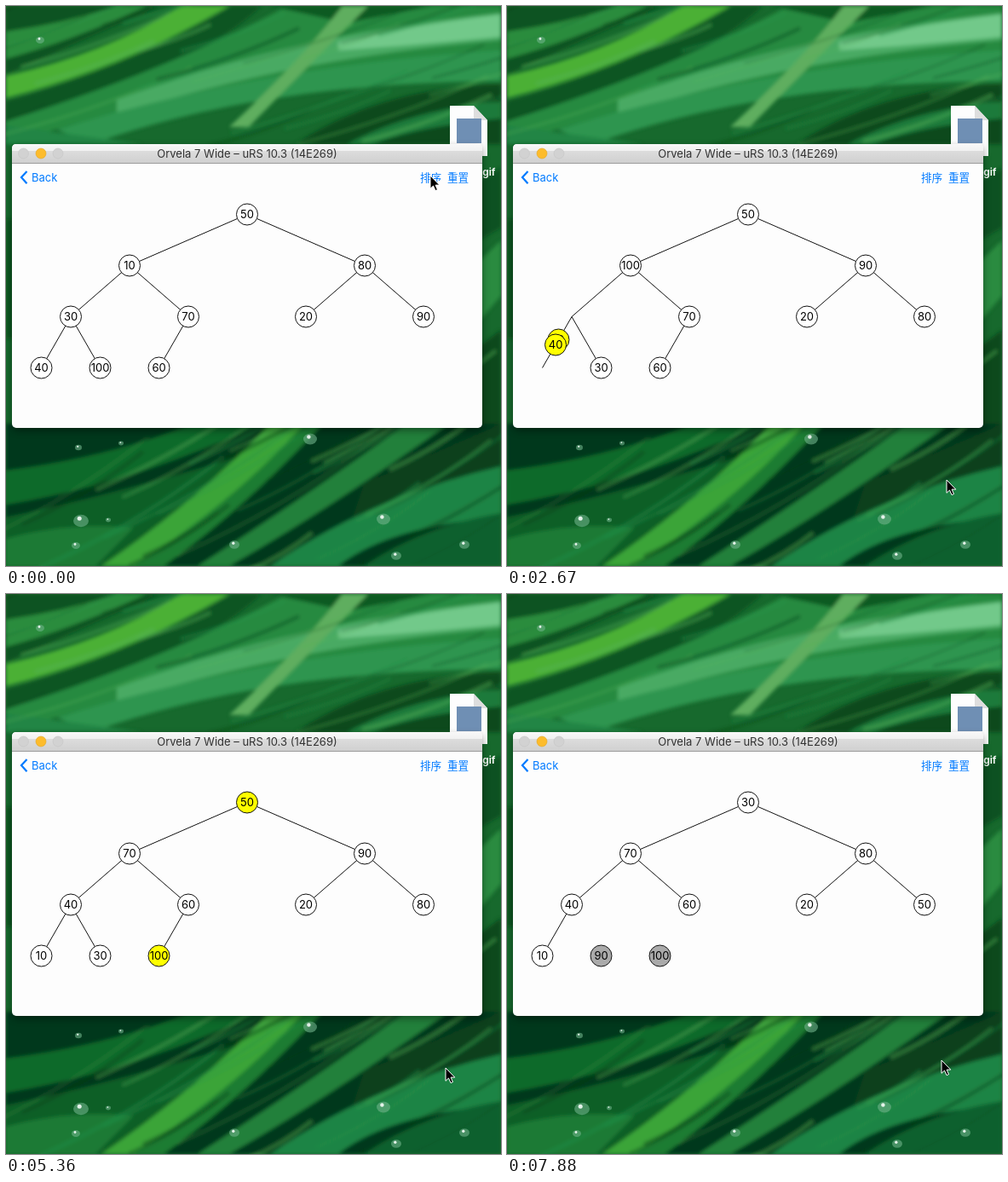
Recreate the animation shown at these times as an HTML page. Size 581 px wide and 657 px high, loop 8 s.

```html
<!DOCTYPE html>
<html lang="en">
<head>
<meta charset="utf-8">
<title>Heap sort</title>
<style>
  html, body { margin: 0; width: 100%; height: 100%; overflow: hidden; background: #0a4a1c; }
  svg { display: block; width: 581px; height: 657px; }
  text { font-family: Inter, "Noto Sans CJK SC", "Noto Sans CJK", sans-serif; font-size: 13px; }
  .mid { text-anchor: middle; }
  .link { fill: #007aff; }
</style>
</head>
<body>
<svg viewBox="0 0 581 657">
  <defs>
    <linearGradient id="bar" x1="0" y1="0" x2="0" y2="1">
      <stop offset="0" stop-color="#f8f8f8"/>
      <stop offset=".33" stop-color="#f1f1f1"/>
      <stop offset=".37" stop-color="#dcdcdc"/>
      <stop offset="1" stop-color="#cfcfcf"/>
    </linearGradient>
    <filter id="soft"><feGaussianBlur stdDeviation="2"/></filter>
    <filter id="shade" x="-10%" y="-10%" width="120%" height="120%"><feGaussianBlur stdDeviation="5"/></filter>
  </defs>
  <rect width="581" height="657" fill="#17692d"/>
  <g id="grass" filter="url(#soft)"></g>
  <g id="drops"></g>

  <path d="M521 117H549L565 134V176H521Z" fill="#fdfdfd"/>
  <path d="M549 117V134H565Z" fill="#dedede"/>
  <rect x="529" y="132" width="29" height="29" fill="#6f8fb4"/>
  <text x="574.5" y="199" text-anchor="end" fill="#fff" font-weight="600" style="font-size:12px">gif</text>

  <rect x="7" y="166" width="552" height="332" rx="5" opacity=".4" filter="url(#shade)"/>
  <rect x="7" y="162" width="552" height="333" rx="5" fill="#fdfdfd"/>
  <path d="M7 185V167Q7 162 12 162H554Q559 162 559 167V185Z" fill="url(#bar)"/>
  <path d="M7 184.5H559" stroke="#9c9c9c"/>
  <g stroke-width=".6">
    <circle cx="20.500" cy="173" r="6" fill="#d2d2d2" stroke="#c4c4c4"/>
    <circle cx="41" cy="173" r="6" fill="#fdbc2c" stroke="#e3a51f"/>
    <circle cx="61" cy="173" r="6" fill="#d2d2d2" stroke="#c4c4c4"/>
  </g>
  <text class="mid" x="283" y="178" fill="#333">Orvela 7 Wide – uRS 10.3 (14E269)</text>

  <path d="M24.500 194L18 201L24.500 208.300" fill="none" stroke="#007aff" stroke-width="2.200"/>
  <text class="link" x="30" y="206">Back</text>
  <text class="link" id="sort" x="486" y="206" style="font-size:12.6px">排序</text>
  <text class="link" x="518" y="206" style="font-size:12.6px">重置</text>

  <g id="edges" stroke="#111" stroke-width="1"></g>
  <g id="nodes"></g>
  <path id="cursor" d="M0 0V15.300L3.500 12L6 17.600L8.500 16.500L6.100 11.100H10.800Z" fill="#000" stroke="#fff" stroke-width="1"/>
</svg>
<script>
const LOOP = 8000, TICK = 148.8, FIRST = 705, SLOT = 595, MOVE = 400;
const $ = id => document.getElementById(id);

function add(parent, tag, attrs, text) {
  const el = document.createElementNS('http://www.w3.org/2000/svg', tag);
  for (const k in attrs) el.setAttribute(k, attrs[k]);
  if (text !== undefined) el.textContent = text;
  parent.appendChild(el);
  return el;
}

// Wallpaper: broad blades, then seeded thin strands
const blades = [
  ['#0b5220', 'M0 0H180L0 80Z'],
  ['#2c8c3c', 'M0 30Q70 20 130 0H165Q80 40 0 62Z'],
  ['#4cb034', 'M0 82Q120 55 205 0H262Q140 72 0 108Z'],
  ['#0c5524', 'M0 112Q150 70 265 0H300Q220 75 0 140Z'],
  ['#258a41', 'M0 135Q190 75 330 0H581V60Q300 70 0 162Z'],
  ['#0d5a24', 'M310 0H500L400 20Z'],
  ['#48aa63', 'M130 110Q330 35 581 8V40Q340 60 130 128Z'],
  ['#72c98a', 'M390 42Q480 22 581 10V36Q480 46 390 52Z'],
  ['#2f9550', 'M60 145Q300 70 581 52V88Q300 90 100 162Z'],
  ['#5fae5f', 'M395 0H425Q350 75 285 142H262Q340 70 395 0Z'],
  ['#0a481c', 'M340 162Q440 95 581 92V162Z'],
  ['#1d7a3a', 'M400 162Q480 120 581 112V132Q490 140 430 162Z'],
  ['#248544', 'M0 140L160 162H0Z'],
  ['#0c5121', 'M555 205L581 190V260L555 275Z'],
  ['#2a8b40', 'M555 300L581 275V340L555 370Z'],
  ['#0c4a1e', 'M555 400L581 380V490H555Z'],
  ['#0d5422', 'M0 250H10V390H0Z'],
  ['#06381a', 'M0 490H581V657H0Z'],
  ['#116a2c', 'M0 545Q120 530 220 490H300Q150 560 0 585Z'],
  ['#0d5e28', 'M0 600Q120 575 270 530L150 657H0Z'],
  ['#1a7a36', 'M0 625Q70 605 150 612L105 657H0Z'],
  ['#3ba437', 'M112 657Q225 580 310 490H372Q270 590 175 657Z'],
  ['#1c7c30', 'M150 657Q270 580 350 490H372Q280 590 185 657Z'],
  ['#23803a', 'M225 657Q360 570 470 490H520Q380 590 262 657Z'],
  ['#073f1b', 'M420 560L581 490V540L400 620Z'],
  ['#1f8444', 'M310 657Q430 575 581 540V600Q450 610 390 657Z'],
  ['#0d602e', 'M420 657Q490 610 581 595V657Z']
];
for (const [fill, d] of blades) add($('grass'), 'path', { d, fill });

let seed = 11;
const rnd = () => (seed = seed * 16807 % 2147483647) / 2147483647;
for (let i = 0; i < 56; i++) {
  const low = i % 2, x = rnd() * 560 - 60, len = 70 + rnd() * 190;
  const y = low ? 520 + rnd() * 150 : 20 + rnd() * 150;
  const rise = len * (low ? .6 : .36);
  add($('grass'), 'path', {
    d: `M${x} ${y}q${len * .55} ${-rise * .4} ${len} ${-rise}`,
    fill: 'none', stroke: ['#074019', '#57b35a', '#27924a'][i % 3],
    'stroke-width': 1 + rnd() * 4, opacity: .45
  });
}
const drops = [[88, 604, 9], [120, 603, 3], [82, 633, 5], [268, 632, 6], [357, 508, 8],
  [443, 602, 8], [458, 645, 6], [538, 632, 6], [40, 40, 5], [85, 518, 4], [135, 513, 3]];
for (const [cx, cy, r] of drops) {
  add($('drops'), 'ellipse', { cx, cy, rx: r, ry: r * .8, fill: '#6fb28a', opacity: .6 });
  add($('drops'), 'circle', { cx: cx - r * .2, cy: cy - r * .3, r: r * .28, fill: '#e4f3ea' });
}

// Tree layout: each row halves the spacing
const values = [50, 10, 80, 30, 70, 20, 90, 40, 100, 60];
const spots = values.map((_, i) => {
  const row = Math.floor(Math.log2(i + 1)), gap = 552 / 2 ** row;
  return [7 + gap * (i + 1.5 - 2 ** row), 244.5 + 60 * row];
});
const edges = spots.map(([x2, y2], i) => {
  if (!i) return null;
  const [x1, y1] = spots[(i - 1) >> 1];
  return add($('edges'), 'line', { x1, y1, x2, y2 });
});
const nodes = values.map(v => {
  const g = add($('nodes'), 'g', {});
  const disc = add(g, 'circle', { r: 12.5, stroke: '#111', 'stroke-width': 1 });
  add(g, 'text', { class: 'mid', y: 4.7, fill: '#000' }, v);
  return { g, disc };
});

// [slot, a, b, sorted]: a swap of two places; sorted retires place b afterwards
const swaps = [[0, 3, 8], [1, 2, 6], [2, 1, 3], [3, 3, 7], [4, 0, 1], [5, 1, 4], [6, 4, 9],
  [7, 0, 9, true], [9, 0, 2], [10, 2, 6], [11, 0, 8, true]];

// [time, x, y]
const trail = [[0, 498, 199], [450, 498, 199], [893, 475, 220], [1250, 475, 220], [1600, 515, 300],
  [1934, 558, 408], [2381, 516, 531], [2530, 516, 556], [6850, 516, 556], [7142, 521, 551],
  [7440, 516, 549], [7738, 510, 547], [LOOP, 510, 547]];

const clamp = v => Math.max(0, Math.min(1, v));
const mix = (a, b, p) => a + (b - a) * p;

// cubic-bezier(.42, 0, .58, 1)
function ease(x) {
  let lo = 0, hi = 1, s = .5;
  for (let i = 0; i < 14; i++) {
    s = (lo + hi) / 2;
    const bx = 1.26 * s * (1 - s) ** 2 + 1.74 * s * s * (1 - s) + s ** 3;
    if (bx < x) lo = s; else hi = s;
  }
  return x <= 0 ? 0 : x >= 1 ? 1 : s * s * (3 - 2 * s);
}

function place(el, x, y) {
  el.setAttribute('transform', `translate(${x.toFixed(2)} ${y.toFixed(2)})`);
}

function draw(t) {
  const order = values.map((_, i) => i);
  const pos = spots.slice(), fill = values.map(() => '#fff');
  let size = values.length;

  for (const [slot, a, b, sorted] of swaps) {
    const age = t - FIRST - slot * SLOT;
    if (age < 0) break;
    [order[a], order[b]] = [order[b], order[a]];
    if (age < SLOT) {
      const p = ease(age / MOVE);
      const between = (from, to) => [0, 1].map(k => mix(spots[from][k], spots[to][k], p));
      pos[a] = between(b, a);
      pos[b] = between(a, b);
      fill[a] = fill[b] = '#ff0';
    } else if (sorted) {
      size = b;
      fill[b] = '#aaa';
    }
  }
  order.forEach((id, i) => {
    place(nodes[id].g, ...pos[i]);
    nodes[id].disc.setAttribute('fill', i >= size ? '#aaa' : fill[i]);
    if (i) edges[i].setAttribute('visibility', i < size ? 'visible' : 'hidden');
  });

  const n = Math.max(1, trail.findIndex(k => k[0] > t));
  const [t0, x0, y0] = trail[n - 1], [t1, x1, y1] = trail[n];
  const p = (t - t0) / (t1 - t0);
  place($('cursor'), mix(x0, x1, p), mix(y0, y1, p));

  const dim = t < 140 ? 0 : 1 - clamp((t - 300) / 400);
  $('sort').setAttribute('opacity', 1 - .8 * dim);
}

const start = performance.now();
function loop(now) {
  const t = Math.max(0, now - start) % LOOP;
  draw(Math.floor((t + 15) / TICK) * TICK);
  requestAnimationFrame(loop);
}
loop(start);
</script>
</body>
</html>
```
